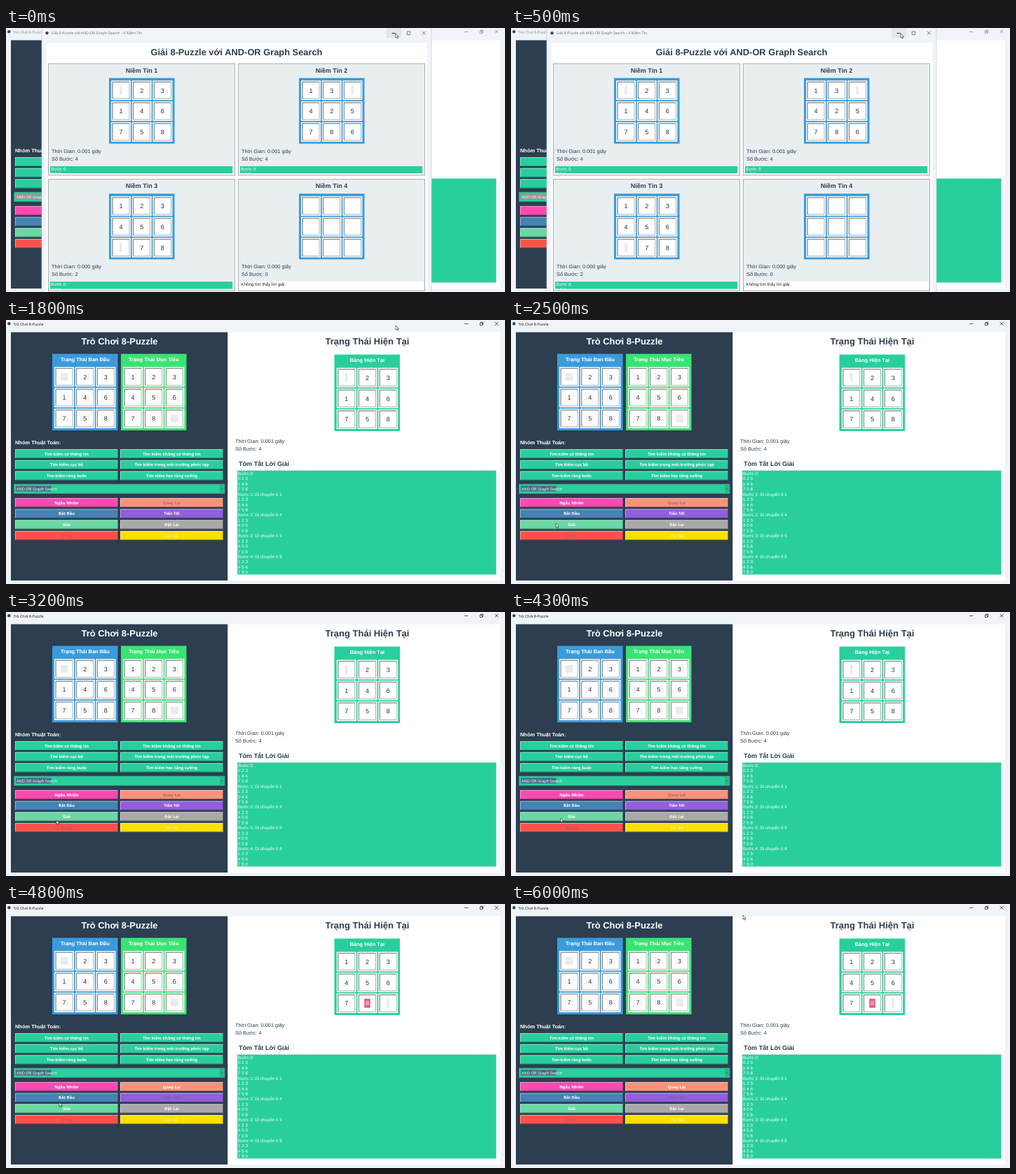
Recreate the animation shown at these times as an HTML page. Size 712x378 px, loop 6200 ms.

```html
<!DOCTYPE html>
<html lang="vi">
<head>
<meta charset="utf-8">
<title>8-Puzzle</title>
<style>
html, body { margin: 0; width: 100%; height: 100%; overflow: hidden; background: #f0f4f9; }
svg { display: block; width: 100%; height: 100%; }
text { font-family: "Liberation Sans", Arial, sans-serif; text-rendering: geometricPrecision; white-space: pre; }
.ui { font-family: "Open Sans", "Noto Sans", sans-serif; }
.b { font-weight: bold; }
</style>
</head>
<body>
<svg id="stage" viewBox="0 0 712 378"></svg>
<script>
const LOOP = 6200, STEP = 100;
const NAVY = '#2c3e50', GREEN = '#28cf9c', BLUE = '#3a9bdc', CHROME = '#f0f4f9';

const rect = (x, y, w, h, fill, extra = '') =>
  `<rect x="${x}" y="${y}" width="${w}" height="${h}" fill="${fill}" ${extra}/>`;
const path = (d, color, w = 0.8, extra = '') =>
  `<path d="${d}" fill="none" stroke="${color}" stroke-width="${w}" ${extra}/>`;
const text = (x, y, size, fill, str, cls = '', mid = false, extra = '') =>
  `<text x="${x}" y="${y}" font-size="${size}" fill="${fill}" class="${cls}"` +
  `${mid ? ' text-anchor="middle"' : ''} ${extra}>${str}</text>`;

// Solution: the blank walks along this route.
const route = [0, 3, 4, 7, 8];
const states = [[0, 2, 3, 1, 4, 6, 7, 5, 8]];
for (let i = 1; i < route.length; i++) {
  const s = states[i - 1].slice();
  s[route[i - 1]] = s[route[i]];
  s[route[i]] = 0;
  states.push(s);
}
const rows = s => [0, 3, 6].map(i => s.slice(i, i + 3).join(' '));

function cell(cx, cy, n, kind, hot) {
  let out = rect(cx - 14, cy - 14, 28, 28, '#fff') +
    rect(cx - 12, cy - 12, 24, 24, '#fff', 'stroke="#9a9ea2" stroke-width=".8"') +
    path(`M${cx - 12} ${cy + 12}V${cy - 12}H${cx + 12}`, '#6f7478', 0.8);
  if (kind === 'entry') {
    out += rect(cx - 5.5, cy - 5.5, 11, 11, n ? '#f1f1f1' : '#ebebeb');
    if (n) out += rect(cx - 3.8, cy - 6, 7.6, 12, '#fff');
  } else if (n === 0) {
    out += rect(cx - 2, cy - 6.5, 3.6, 13, '#ebebeb');
  }
  if (hot) out += rect(cx - 4.2, cy - 6.5, 8.4, 13, '#e8587f');
  if (n) out += text(cx, cy + 3.3, 9.1, hot ? '#fff' : '#2b2f33', n, '', true);
  return out;
}

// x, y: centre of the first cell
const cells = (x, y, s, kind, hot = -1) =>
  s.map((n, i) => cell(x + (i % 3) * 29.7, y + Math.floor(i / 3) * 29.8, n, kind, i === hot)).join('');

function titledBoard(x, y, color, title) {
  return rect(x, y, 93.5, 109.5, color) + text(x + 46.8, y + 10.2, 7.45, '#fff', title, 'b', true);
}

function button(x, y, color, label, ink = '#fff', id = '') {
  return rect(x, y, 147, 13, color) +
    path(`M${x + .4} ${y + 12.6}V${y + .4}H${x + 146.6}`, '#fff', 0.8, 'opacity=".6"') +
    path(`M${x + .4} ${y + 12.6}H${x + 146.6}V${y + .4}`, '#1d2833', 0.8, 'opacity=".55"') +
    text(x + 73.5, y + 8.7, 5.8, ink, label, 'ui b', true, id && `id="${id}"`);
}

const minus = (x, y) => `M${x - 2.5} ${y}h5`;
const cross = (x, y) => `M${x - 2.4} ${y - 2.4}l4.8 4.8m0 -4.8l-4.8 4.8`;

function mainWindow() {
  let out = rect(0, 0, 712, 378, CHROME) + rect(7, 17.5, 309.5, 355.5, NAVY) +
    rect(316.5, 17.5, 388.5, 355.5, '#fff') +
    '<circle cx="4.3" cy="5.3" r="2.2" fill="#33475b"/>' +
    `<g id="mainBar">${text(10.5, 7.5, 5.4, '#111', 'Trò Chơi 8-Puzzle', 'ui')}` +
    path(minus(656.8, 5.5) + cross(700, 5.3) +
      'M676.3 4.4h3.2v3.2h-3.2zM677.4 4.2v-1.1h3.4v3.4h-1.1', '#222', 0.75) + '</g>';

  out += text(162, 35, 12.95, '#fff', 'Trò Chơi 8-Puzzle', 'b', true) +
    titledBoard(66, 48.5, BLUE, 'Trạng Thái Ban Đầu') + cells(83, 81.3, states[0], 'entry') +
    titledBoard(164, 48.5, '#38e474', 'Trạng Thái Mục Tiêu') +
    cells(181, 81.3, [1, 2, 3, 4, 5, 6, 7, 8, 0], 'entry') +
    text(13, 177.6, 7.45, '#fff', 'Nhóm Thuật Toán:', 'b');

  [['Tìm kiếm có thông tin', 'Tìm kiếm không có thông tin'],
   ['Tìm kiếm cục bộ', 'Tìm kiếm trong môi trường phức tạp'],
   ['Tìm kiếm ràng buộc', 'Tìm kiếm học tăng cường']].forEach((pair, r) =>
    pair.forEach((label, c) => { out += button(13 + 150 * c, 185 + 15.7 * r, GREEN, label); }));

  out += rect(11.5, 235, 300.5, 13.5, GREEN, 'stroke="#4f7f7c" stroke-width=".8"') +
    rect(14, 237.5, 50.5, 8, '#47708a', 'id="pick"') +
    text(15, 243.7, 5.6, '#fff', 'AND-OR Graph Search', 'ui') +
    rect(305, 236, 6, 11.5, '#25b88c') + path('M306.8 241.2l1.3 1.3 1.3 -1.3', '#1d3b3a', 0.7);

  const y = r => 255 + 15.7 * r;
  out += button(13, y(0), '#fd49b0', 'Ngẫu Nhiên') + button(163, y(0), '#fb937b', 'Quay Lại', '#fff', 'back') +
    button(13, y(1), '#4682b4', 'Bắt Đầu') + button(163, y(1), '#915fdc', 'Tiến Tới', '#fff', 'next') +
    button(13, y(2), '#68d8a4', 'Giải') + button(163, y(2), '#a9a9a9', 'Đặt Lại') +
    button(13, y(3), '#f9524a', 'Dừng', '#a2605c') + button(163, y(3), '#fbe000', 'Tốc Độ', '#f6efa4');

  out += text(515.5, 35.4, 13, NAVY, 'Trạng Thái Hiện Tại', 'b', true) +
    titledBoard(468.5, 49.5, GREEN, 'Bảng Hiện Tại') + '<g id="board"></g>' +
    text(327, 176.2, 7.35, NAVY, 'Thời Gian: 0.001 giây') +
    text(327, 187.3, 7.35, NAVY, 'Số Bước: 4') +
    text(332, 209.2, 9.1, NAVY, 'Tóm Tắt Lời Giải', 'b') +
    rect(330, 215.5, 369.5, 149, GREEN, 'stroke="#b9dcd2" stroke-width=".8"');
  const moved = i => states[i - 1][route[i]];
  states.flatMap((s, i) => [i ? `Bước ${i}: Di chuyển ô ${moved(i)}` : 'Bước 0:', ...rows(s)])
    .forEach((line, i) => { out += text(331, 221.8 + 7.45 * i, 6.27, '#fff', line); });
  return out;
}

function panel(i, s, time, steps) {
  const dx = (i % 2) * 271, dy = i > 1 ? 165.6 : 0, found = steps > 0;
  const strip = `strip${i}`;
  return `<g transform="translate(${dx} ${dy})">` +
    rect(60.5, 51, 266, 160, '#e9eef0', 'stroke="#a3a8aa" stroke-width=".9"') +
    text(193.5, 63.8, 9, NAVY, `Niềm Tin ${i + 1}`, 'b', true) +
    rect(147, 71.6, 93.5, 94, BLUE) + cells(164, 89.2, s, found ? 'plain' : 'none') +
    text(65, 178.7, 7.4, NAVY, `Thời Gian: ${time} giây`) +
    text(65, 189.9, 7.4, NAVY, `Số Bước: ${steps}`) +
    rect(62.5, 197, 262, 12, '#fff') +
    `<clipPath id="${strip}">${rect(63, 197.5, 260.5, 10.7, '#000')}</clipPath><g clip-path="url(#${strip})">` +
    (found
      ? rect(63, 197.5, 260.5, 10.7, GREEN) + text(64.3, 203.9, 6.27, '#fff', 'Bước 0:') +
        text(64.3, 211.3, 6.27, '#fff', rows(s)[0])
      : text(64.3, 203.9, 6.25, '#222', 'Không tìm thấy lời giải.')) +
    '</g></g>';
}

function dialog() {
  return rect(51, -2, 556, 382, CHROME, 'stroke="#c6cacf" stroke-width=".7"') +
    rect(57.5, 21.5, 543.5, 357, '#fff') + rect(543, 0, 21.5, 14, '#e3e7ec') +
    '<circle cx="58.5" cy="7.3" r="2.2" fill="#33475b"/>' +
    `<g id="dlgBar">${text(64.5, 9.4, 5.4, '#111', 'Giải 8-Puzzle với AND-OR Graph Search - 4 Niềm Tin', 'ui')}` +
    path('M572.2 5h4.6v4.6h-4.6z' + cross(596.2, 7.3), '#111', 0.85) + '</g>' +
    path(minus(553, 7.5), '#222', 0.85) +
    text(329, 39.2, 12.85, NAVY, 'Giải 8-Puzzle với AND-OR Graph Search', 'b', true) +
    panel(0, states[0], '0.001', 4) +
    panel(1, [1, 3, 0, 4, 2, 5, 7, 8, 6], '0.001', 4) +
    panel(2, [1, 2, 3, 4, 5, 6, 0, 7, 8], '0.000', 2) +
    panel(3, Array(9).fill(''), '0.000', 0);
}

// time, x, y of the pointer tip
const track = [
  [0, 556, 8], [2000, 556, 8], [2200, 420, 120], [2400, 130, 270], [2550, 31, 302], [2700, 88, 291],
  [2800, 79, 303], [2950, 79, 303], [3200, 72, 298], [3400, 70.5, 295], [4300, 70.5, 295],
  [4800, 76, 284], [5150, 76, 284], [5500, 205, 150], [5800, 324, 24], [5900, 330, 17], [6000, 331, 16]
];
function pointer(t) {
  const i = track.findIndex(k => k[0] > t);
  if (i < 0) return track[track.length - 1].slice(1);
  const [t0, x0, y0] = track[i - 1], [t1, x1, y1] = track[i], p = (t - t0) / (t1 - t0);
  return [x0 + (x1 - x0) * p, y0 + (y1 - y0) * p];
}

const $ = id => document.getElementById(id);
$('stage').innerHTML = mainWindow() + `<g id="dlg">${dialog()}</g>` +
  '<path id="tip" d="M0 0V6L1.4 4.8L2.4 7L3.4 6.5L2.4 4.4H4.3Z" fill="#fff" stroke="#1a1a1a" stroke-width=".6"/>';

let shown = -1;
function draw(t) {
  const open = t < 1800;
  const step = t < 4400 ? 0 : Math.min(4, Math.floor((t - 4300) / 100));
  if (step !== shown) {
    $('board').innerHTML = cells(485.8, 82.5, states[step], 'plain', step ? route[step - 1] : -1);
    shown = step;
  }
  $('dlg').style.display = open ? '' : 'none';
  $('dlgBar').style.opacity = t < 1400 ? 0.6 : 1;
  $('mainBar').style.opacity = open ? 0.5 : 1;
  $('pick').setAttribute('fill', open ? '#929a98' : '#47708a');
  $('back').setAttribute('fill', step ? '#fff' : '#9a6f68');
  $('next').setAttribute('fill', step < 4 ? '#fff' : '#75628f');
  $('tip').setAttribute('transform', `translate(${pointer(t)})`);
}

const start = performance.now();
function tick() {
  const t = (performance.now() - start) % LOOP;
  draw(Math.floor(t / STEP) * STEP);
  requestAnimationFrame(tick);
}
draw(0);
requestAnimationFrame(tick);
</script>
</body>
</html>
```
